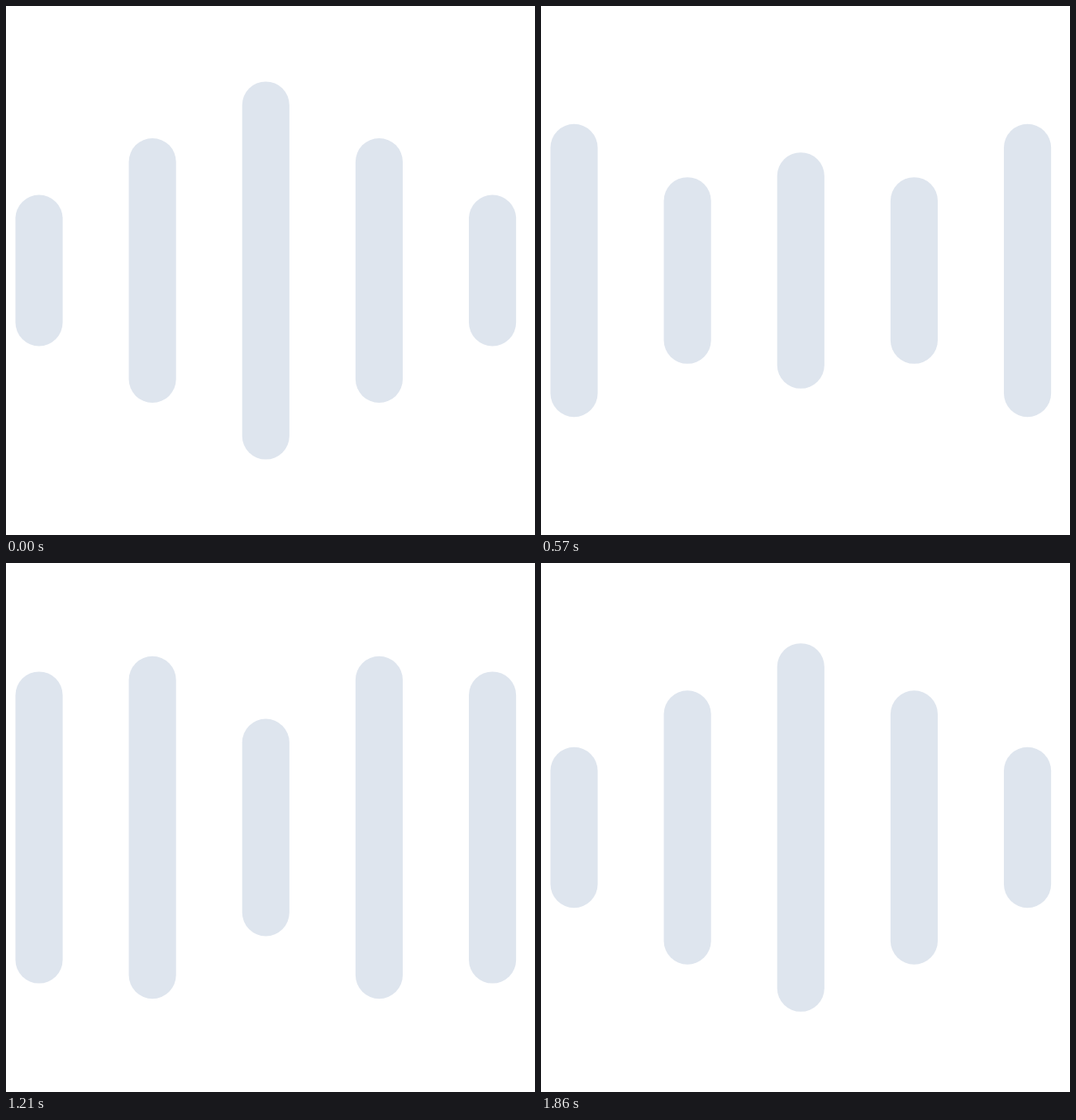
Recreate the animation shown at these times as an HTML page. Size 640 by 640 pixels, loop 1.93 s.

```html
<!DOCTYPE html>
<html lang="en">
<head>
<meta charset="utf-8">
<title>Sound bars</title>
<style>
  html, body { margin: 0; width: 100%; height: 100%; overflow: hidden; background: #fff; }
  svg { display: block; width: 100%; height: 100%; }
</style>
</head>
<body>
<svg id="stage" viewBox="0 0 56 56" fill="#dee5ee"></svg>
<script>
const LOOP = 1930;
const MIDDLE = 28;

// Keyframes as [step, top edge]; 48 steps make one cycle.
const outer = [[0, 20], [24, 8], [48, 20]];
const inner = [[0, 14], [11.85, 20.1], [24, 12.5], [36, 8], [48, 14]];
const center = [[0, 8], [24, 20], [48, 8]];

const stage = document.getElementById('stage');
const bars = [outer, inner, center, inner, outer].map((keys, i) => {
  const rect = document.createElementNS('http://www.w3.org/2000/svg', 'rect');
  rect.setAttribute('x', 1 + 12 * i);
  rect.setAttribute('width', 5);
  rect.setAttribute('rx', 2.5);
  stage.append(rect);
  return { rect, keys };
});

function valueAt(keys, step) {
  const next = keys.findIndex(([at]) => at > step);
  const [t0, v0] = keys[next - 1];
  const [t1, v1] = keys[next];
  return v0 + (v1 - v0) * (step - t0) / (t1 - t0);
}

// Pictures change 14 times a second, on a 10 ms clock, sampling a 25-per-second motion.
function stepAt(time) {
  const picture = Math.floor((Math.floor(time / 10) + 0.5) * 0.14);
  return Math.floor((picture + 0.5) * 25 / 14);
}

function draw(time) {
  const step = stepAt(time % LOOP);
  for (const { rect, keys } of bars) {
    const top = valueAt(keys, step);
    rect.setAttribute('y', top);
    rect.setAttribute('height', 2 * (MIDDLE - top));
  }
}

function tick() {
  draw(performance.now() - start);
  requestAnimationFrame(tick);
}

const start = performance.now();
tick();
</script>
</body>
</html>
```
